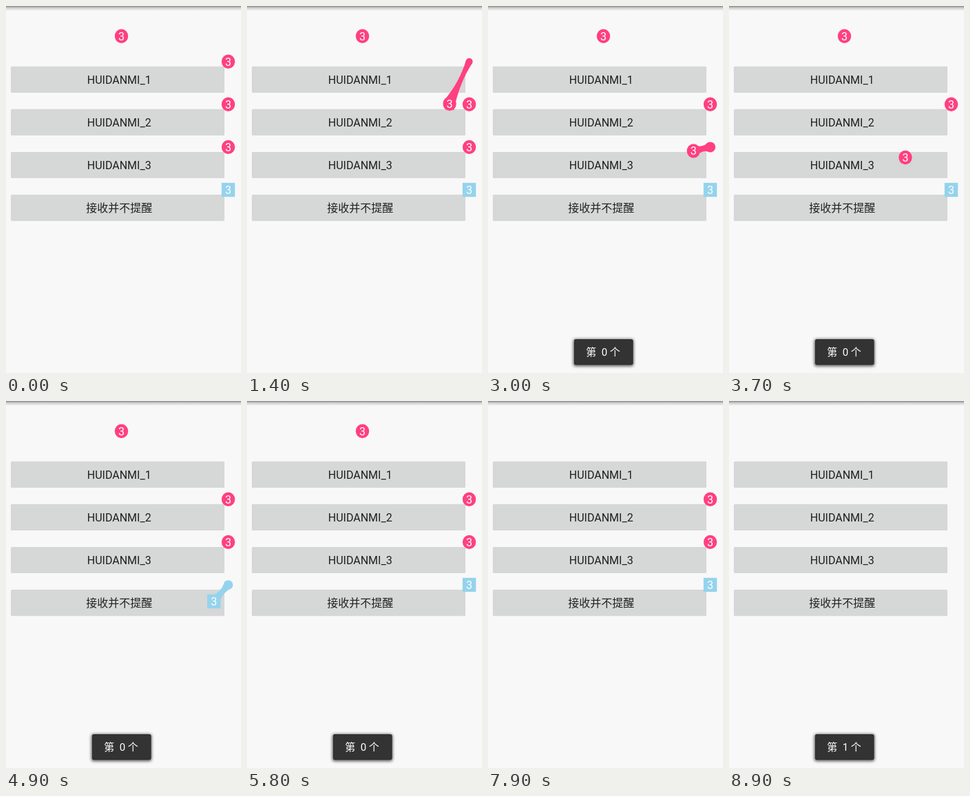
Write an HTML page that moves like this. It is 341 px wide and 533 px high and loops after 9 s.

```html
<!DOCTYPE html>
<html lang="zh">
<head>
<meta charset="utf-8">
<title>Sticky badges</title>
<style>
  html, body { margin: 0; width: 100%; height: 100%; overflow: hidden; background: #f8f8f8; }
  svg { display: block; width: 341px; height: 533px; }
  text { font: 16px Roboto, "Noto Sans CJK SC", "Noto Sans CJK", sans-serif; text-anchor: middle; white-space: pre; }
  .label { fill: #202020; }
  .count { fill: #fff; }
  #toast text { font-size: 15px; fill: #fff; }
</style>
</head>
<body>
<svg viewBox="0 0 341 533">
  <defs>
    <linearGradient id="shade" x2="0" y2="1">
      <stop offset="0" stop-color="#858585"/>
      <stop offset=".4" stop-color="#cfcfcf"/>
      <stop offset="1" stop-color="#f8f8f8"/>
    </linearGradient>
    <filter id="blur" x="-20%" y="-30%" width="140%" height="160%"><feGaussianBlur stdDeviation="2.2"/></filter>
  </defs>
  <rect width="341" height="533" fill="#f8f8f8"/>
  <rect width="341" height="7" fill="url(#shade)"/>
  <g id="buttons"></g>
  <g id="badges"></g>
  <g id="toast">
    <rect x="124" y="484" width="87" height="39" rx="3" opacity=".7" filter="url(#blur)"/>
    <rect x="125.5" y="484.5" width="84.5" height="36" rx="1.5" fill="#333" stroke="#2b2b2b"/>
    <text x="167" y="508"></text>
  </g>
</svg>
<script>
const LOOP = 9000, STEP = 100, ROW = 62.1, REACH = 75;
const PINK = '#ff4081', BLUE = '#95d3ec', RX = 9.7, RY = 10.2;
const $ = id => document.getElementById(id);
const clamp = v => Math.min(1, Math.max(0, v));
const ramp = (t, from, to) => clamp((t - from) / (to - from));
const show = (node, on) => node.setAttribute('visibility', on ? 'visible' : 'hidden');

function make(parent, tag, attrs, text = '') {
  const node = document.createElementNS('http://www.w3.org/2000/svg', tag);
  for (const key in attrs) node.setAttribute(key, attrs[key]);
  node.textContent = text;
  return parent.appendChild(node);
}

['HUIDANMI_1', 'HUIDANMI_2', 'HUIDANMI_3', '接收并不提醒'].forEach((name, i) => {
  const y = 87.7 + ROW * i;
  make($('buttons'), 'rect', { x: 7, y, width: 310, height: 38.2, rx: 1.5, fill: '#d6d7d7' });
  make($('buttons'), 'text', { x: 164.2, y: y + 25, class: 'label' }, name);
});

class Badge {
  constructor(x, y, gone, square) {
    const color = square ? BLUE : PINK;
    Object.assign(this, { x, y, gone, square, moves: [], torn: Infinity });
    this.anchor = make($('badges'), 'circle', { cx: x, cy: y, fill: color });
    this.band = make($('badges'), 'path', { fill: color });
    this.body = make($('badges'), 'g', {});
    if (square) make(this.body, 'rect', { x: -RX, y: -RY, width: 2 * RX, height: 2 * RY, fill: color });
    else make(this.body, 'ellipse', { rx: RX, ry: RY, fill: color });
    make(this.body, 'text', { y: 5.8, class: 'count' }, '3');
  }

  // bend above 1 slows towards the end, below 1 speeds up
  move(from, to, x, y, bend = 1) {
    this.moves.push({ from, to, x, y, bend });
    for (let t = from; t <= to; t += STEP) {
      if (this.distance(t) > REACH) this.torn = Math.min(this.torn, t);
    }
    return this;
  }

  // spring a little past the anchor, then settle on it
  release(from, to, rest, overshoot, bend) {
    return this.move(from, to, this.x + overshoot, this.y - overshoot / 2, bend)
      .move(rest - STEP, rest, this.x, this.y);
  }

  place(t) {
    return this.moves.reduce(([x, y], m) => {
      const k = 1 - (1 - ramp(t, m.from, m.to)) ** m.bend;
      return [x + (m.x - x) * k, y + (m.y - y) * k];
    }, [this.x, this.y]);
  }

  distance(t) {
    const [x, y] = this.place(t);
    return Math.hypot(x - this.x, y - this.y);
  }

  draw(t) {
    const [x, y] = this.place(t), d = this.distance(t);
    const stuck = t < this.gone && t < this.torn && d > 2;
    show(this.body, t < this.gone);
    show(this.anchor, stuck);
    show(this.band, stuck);
    this.body.setAttribute('transform', `translate(${x} ${y})`);
    if (!stuck) return;
    const r = Math.max(5, 10 - d / 10);
    this.anchor.setAttribute('r', r);
    this.band.setAttribute('d', this.bandPath(x, y, d, r));
  }

  bandPath(x, y, d, r) {
    const ux = (x - this.x) / d, uy = (y - this.y) / d;
    const at = (cx, cy, side, along = 0) =>
      `${cx + uy * side + ux * along} ${cy - ux * side + uy * along}`;
    const mid = `${(this.x + x) / 2} ${(this.y + y) / 2}`;
    const lean = this.square ? 0 : 6 * clamp(d / 60);
    return `M${at(this.x, this.y, r)}Q${mid} ${at(x, y, 9.4, lean)}` +
      `L${at(x, y, -9.6)}Q${mid} ${at(this.x, this.y, -r)}Z`;
  }
}

const side = (row, gone, square) => new Badge(322.5, 80.7 + ROW * row, gone, square);
const badges = [
  side(0, 2200).move(700, 1400, 294, 142, 1.6).move(1600, 1900, 220, 191),
  side(1, 8400),
  side(2, 8400).move(2800, 3400, 210, 231, .6).release(3500, 4100, 4200, 3, 1.25),
  side(3, 8400, true).move(4500, 4900, 301.7, 291).release(5100, 5300, 5600, 1),
  new Badge(167.5, 43.7, 7900).move(5900, 6300, 155, 110).move(6300, 6700, 153.5, 155.5, 3),
];

function drawToast(t) {
  const first = ramp(t, 2600, 3000) * (1 - ramp(t, 5800, 6200));
  $('toast').setAttribute('opacity', first + ramp(t, 8400, 8850));
  $('toast').lastElementChild.textContent = `第  ${t < LOOP * .8 ? 0 : 1} 个`;
}

const start = performance.now();
function frame() {
  const t = Math.floor((performance.now() - start) % LOOP / STEP) * STEP;
  badges.forEach(badge => badge.draw(t));
  drawToast(t);
  requestAnimationFrame(frame);
}
frame();
</script>
</body>
</html>
```
